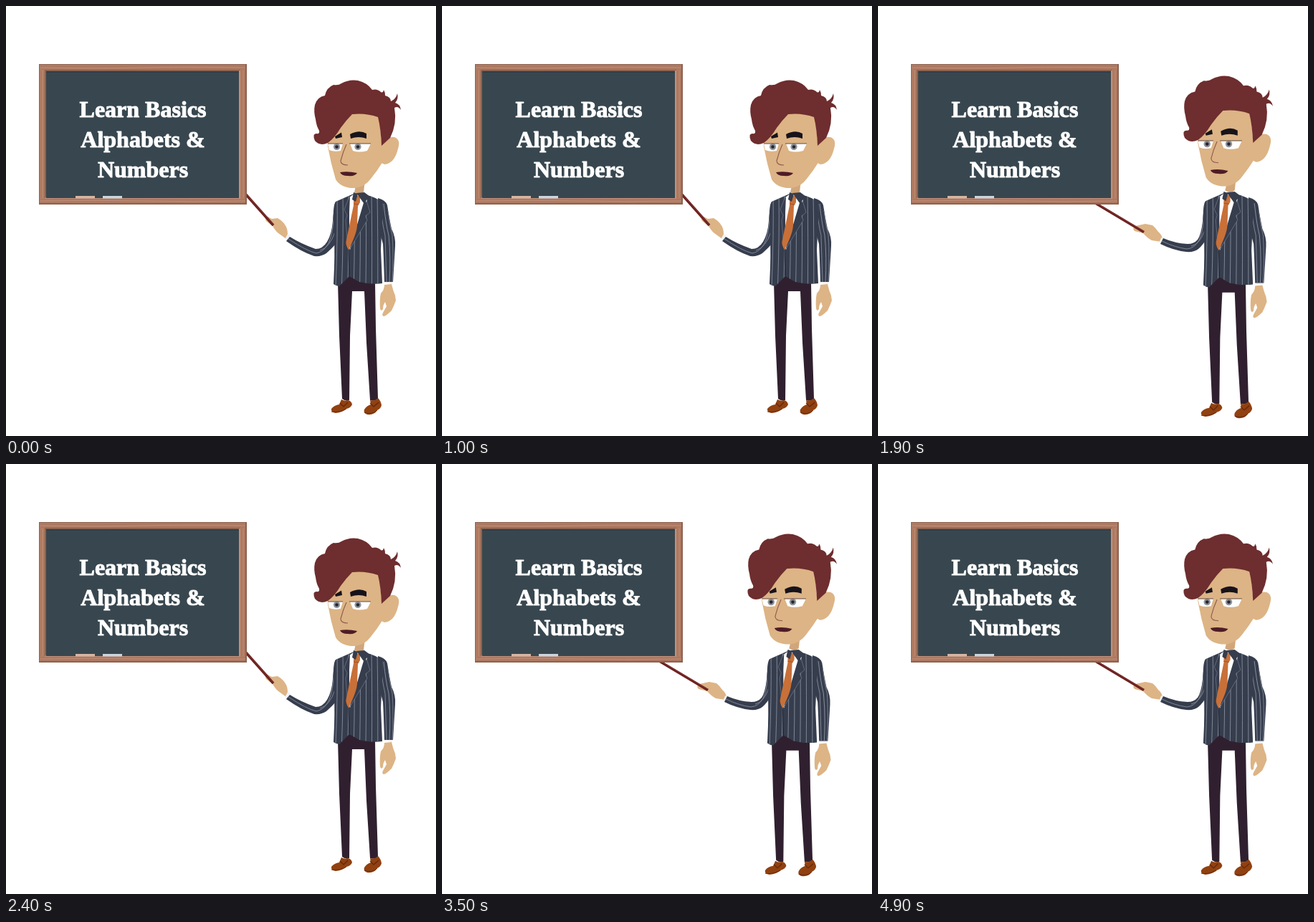
Write an HTML page with a canvas that moves like this. It is 600 px wide and 600 px high and loops after 5000 ms.

```html
<!DOCTYPE html>
<html lang="en">
<head>
<meta charset="utf-8">
<title>Teacher at the board</title>
<style>
html, body { margin: 0; width: 100%; height: 100%; overflow: hidden; background: #fff; }
canvas { display: block; width: 100vw; height: 100vh; }
</style>
</head>
<body>
<canvas id="stage" width="600" height="600"></canvas>
<script>
const ctx = document.getElementById('stage').getContext('2d');

const SKIN = '#ddb485', HAIR = '#6e2d2e', SUIT = '#363d4d', STRIPE = '#868d9c';
const PANTS = '#30202f', SHOE = '#914110', TIE = '#c87038', STICK = '#6a201f';
const BOARD = '#38474f', WOOD = '#b27d65', WOOD_DARK = '#8c624f', WOOD_LIGHT = '#c0907a';

const HALF = 500;

// Each pose: head and body as [scaleX, scaleY, dx, dy], plus its own arm.
const POSES = [
  {
    head: [1, 1, 0, 0],
    body: [1, 1, 0, 0],
    stick: [325, 252, 373, 306],
    hand: 'M391 325 L380 317 Q376 314 372 307 L363 300 Q360 295 365 294 L371 297 L379 296 Q386 300 389 305 Q393 310 393 318Z',
    cuff: [391, 326, 395, 319],
    arm: 'M461 274 Q457 282 456 299 Q455 317 448 329 Q442 339 432 339 Q412 332 396 322 L391 328 Q412 343 430 349 Q440 350 447 345 Q454 339 462 330Z',
    seams: ['M457 296 Q455 341 433 345 Q420 342 394 325', 'M459 315 Q452 337 438 341']
  },
  {
    head: [1.025, 1.023, -13.8, -8.4],
    body: [1.018, 1.02, -11.3, -6.3],
    stick: [299, 272.5, 371, 315.5],
    hand: 'M395 329 L382 327 Q376 324 370 317 L358 314 Q354 310 359 307 L373 304 L383 306 Q388 310 391 315 Q396 319 397 325Z',
    cuff: [394, 331, 397, 324],
    arm: 'M458 274 Q454 283 453 300 Q451 319 446 326 Q441 332 432 332 Q414 331 398 324 L394 332 Q412 341 430 343 Q441 344 447 339 Q454 333 460 322Z',
    seams: ['M454 296 Q453 337 431 339 Q415 337 396 328', 'M456 312 Q450 332 437 335']
  }
];

function fill(path, color) {
  ctx.fillStyle = color;
  ctx.fill(new Path2D(path));
}

function stroke(path, color, width) {
  ctx.strokeStyle = color;
  ctx.lineWidth = width;
  ctx.stroke(new Path2D(path));
}

function line(x1, y1, x2, y2, color, width) {
  stroke(`M${x1} ${y1} L${x2} ${y2}`, color, width);
}

function dot(x, y, r, color) {
  ctx.fillStyle = color;
  ctx.beginPath();
  ctx.arc(x, y, r, 0, Math.PI * 2);
  ctx.fill();
}

function rect(x, y, w, h, color) {
  ctx.fillStyle = color;
  ctx.fillRect(x, y, w, h);
}

function placed([sx, sy, dx, dy], draw) {
  ctx.save();
  ctx.transform(sx, 0, 0, sy, dx, dy);
  draw();
  ctx.restore();
}

function clipped(path, draw) {
  ctx.save();
  ctx.clip(new Path2D(path));
  draw();
  ctx.restore();
}

function drawLegs() {
  fill('M463 385 L480 376 L515 386 L516 450 L519 548 Q514 552 508 550 L503 470 L500 398 L483 398 L480 460 L479 550 Q474 552 469 548 L465 460Z', PANTS);
  fill('M468 549 Q473 552 477 550 Q482 551 483 556 Q481 561 475 562 Q470 567 460 568 Q453 567 454 562 Q458 557 465 556Z', SHOE);
  fill('M508 550 Q514 552 519 547 Q523 551 524 557 Q523 562 518 564 Q514 571 504 570 Q498 568 500 563 Q503 558 509 556Z', SHOE);
  stroke('M466 554 L471 559 L477 553 M508 554 L513 559 L520 553', '#61270d', 1.2);
  stroke('M454 566 Q464 568 475 562 M500 567 Q511 571 518 564', '#6d2d0d', 1);
}

function drawRightArm() {
  fill('M528 389 L538 388 Q540 397 543 404 L544 411 Q541 419 538 425 Q531 432 527 433 Q524 432 526 428 L531 419 L529 413 Q526 417 526 423 Q523 427 522 422 Q521 409 523 401 Q528 396 528 389Z', SKIN);
  fill('M528 383 L540 383 L539 388 L528 387Z', '#f4f4f6');
  const sleeve = 'M519 268 Q530 271 532 278 Q535 297 538 311 Q544 323 543 335 L540 385 L528 385 Q527 350 526 332 L519 306Z';
  fill(sleeve, SUIT);
  clipped(sleeve, () => {
    stroke('M527 276 Q530 304 534 320 Q537 350 535 386', STRIPE, 1);
    stroke('M533 285 Q535 304 539 320 Q541 350 539 386', STRIPE, .8);
    stroke('M522 276 Q525 304 529 320 L531 386', STRIPE, .9);
  });
}

function drawJacket() {
  const coat = 'M485 262 L460 273 Q456 278 457 302 Q459 332 458 365 L457 388 Q461 391 465 391 L479 377 L493 385 Q510 389 525 387 L523 340 Q525 300 526 276 Q522 270 508 265Z';
  fill(coat, SUIT);
  clipped(coat, () => {
    for (let i = 0; i < 9; i++) {
      const top = 462 + i * 8;
      const low = 460 + i * 8.4;
      stroke(`M${top} 262 Q${top + 1} 320 ${low} 392`, STRIPE, .9);
    }
  });
  fill('M479 267 L486 262 L501 264 L504 271 L480 340 L476 332Z', '#fff');
  // lapels
  fill('M480 265 L472 283 L476 292 L474 299 L477 337 L479 315 L479 288Z', SUIT);
  fill('M501 268 L507 288 L501 293 L504 299 L479 340 L490 305Z', SUIT);
  stroke('M479 266 L472 284 L476 292 L474 299 L477 335', '#747d8f', .7);
  stroke('M502 268 L508 288 L502 293 L504 299 L479 340', '#747d8f', .7);
  line(478, 340, 479, 376, '#202635', 1);
  // tie and collar
  fill('M487 263 L494 266 L494 274 L491 279 L490 305 Q490 317 478 340 Q473 333 475 326 L485 278 L485 271Z', TIE);
  line(485, 276, 492, 277, '#a65227', 1);
  fill('M485 260 L483 270 L488 273 L491 262Z', SUIT);
  fill('M489 261 L499 275 L508 266 L500 260Z', SUIT);
}

function drawHead() {
  fill('M489 246 L501 242 L499 260 Q493 264 486 260Z', '#d1a67a');
  fill('M520 193 Q531 181 542 183 Q551 186 547 199 Q542 220 528 221 L518 216Z', SKIN);
  fill('M475 140 L520 140 L526 217 Q518 230 509 241 Q501 252 488 254 Q468 255 460 242 Q453 219 449 196 L448 184Z', SKIN);

  // eyes
  fill('M449 192 L470 192 L467 202 Q458 204 451 201Z', '#fff');
  fill('M480 192 L509 192 L504 202 Q493 205 484 202Z', '#fff');
  for (const x of [461.5, 491]) {
    dot(x, 196.5, 4.6, '#8c939b');
    dot(x, 196.5, 2.3, '#28252c');
  }
  stroke('M449 192 L470 192 M479 192 L509 192', '#4d3a38', .9);
  fill('M459 182 L468 176.5 L469 183 L460 185Z', '#17131a');
  fill('M480 179 Q493 172 503 178 L503 185 Q492 181 481 185Z', '#17131a');

  // nose and mouth
  stroke('M475 193 Q470 204 467 216 Q467 222 477 222', '#8e5b50', 1.1);
  fill('M466 232 Q477 230 490 233 Q487 238 477 237 Q468 237 466 232Z', '#4e1b26');

  fill('M437 174 Q433 167 432 158 Q429 147 431 138 Q434 127 445 125 Q447 114 457 110 Q464 111 468 108 Q479 102 491 104 Q504 107 511 117 Q518 115 523 120 Q526 122 527 117 Q529 120 529 125 Q537 127 537 133 Q544 130 546 122 Q548 130 543 135 Q550 137 551 145 Q547 139 542 142 Q546 164 536 184 L524 195 Q523 171 519 155 Q502 149 483 151 Q475 159 467 170 Q458 185 449 191 Q438 196 431 188 Q427 178 433 178 Q438 179 437 174Z', HAIR);
}

function drawLeftArm(pose) {
  const [x1, y1, x2, y2] = pose.stick;
  fill(pose.hand, SKIN);
  line(x1, y1, x2, y2, STICK, 3.6);
  line(x1, y1 - 1, x2, y2 - 1, '#8a3933', .8);
  line(...pose.cuff, '#f1f2f4', 4);
  fill(pose.arm, SUIT);
  clipped(pose.arm, () => pose.seams.forEach(s => stroke(s, STRIPE, .9)));
}

function drawBoard() {
  rect(46, 81, 290, 196, WOOD_DARK);
  rect(47, 82, 287, 193, WOOD);
  // wood grain
  for (let i = 0; i < 3; i++) {
    const d = 84 + i * 2;
    const tone = i % 2 ? WOOD_LIGHT : '#a5705a';
    stroke(`M48 ${d} Q130 ${d + 1.5} 190 ${d} T334 ${d}`, tone, .7);
    stroke(`M48 ${d + 186} Q120 ${d + 184.5} 190 ${d + 186} T334 ${d + 186}`, tone, .7);
    line(49 + i * 2, 90, 49 + i * 2, 268, tone, .7);
    line(329 + i * 2, 90, 329 + i * 2, 268, tone, .7);
  }
  rect(54, 89, 273, 179, WOOD_DARK);
  rect(325, 90, 2, 179, WOOD_LIGHT);
  rect(55, 267, 272, 2, WOOD_LIGHT);
  rect(56, 91, 269, 177, BOARD);
  rect(56, 91, 269, 1.5, '#2d3a42');
  rect(97, 265, 27, 3.5, '#d6b5a3');
  rect(135, 265, 27, 3.5, '#cbd5dd');

  ctx.font = 'bold 32px "Liberation Serif", "Times New Roman", serif';
  ctx.textAlign = 'center';
  ctx.fillStyle = ctx.strokeStyle = '#fff';
  ctx.lineWidth = 1;
  ctx.lineJoin = 'round';
  ['Learn Basics', 'Alphabets &', 'Numbers'].forEach((text, i) => {
    ctx.fillText(text, 191, 155 + i * 42);
    ctx.strokeText(text, 191, 155 + i * 42);
  });
}

function draw(pose) {
  rect(0, 0, 600, 600, '#fff');
  placed(pose.body, () => {
    drawLegs();
    drawRightArm();
  });
  drawLeftArm(pose);
  placed(pose.head, drawHead);
  placed(pose.body, drawJacket);
  drawBoard();
}

const start = performance.now();

function tick() {
  const t = Math.max(0, performance.now() - start);
  draw(POSES[Math.floor(t / HALF) % 2]);
  requestAnimationFrame(tick);
}
tick();
</script>
</body>
</html>
```
